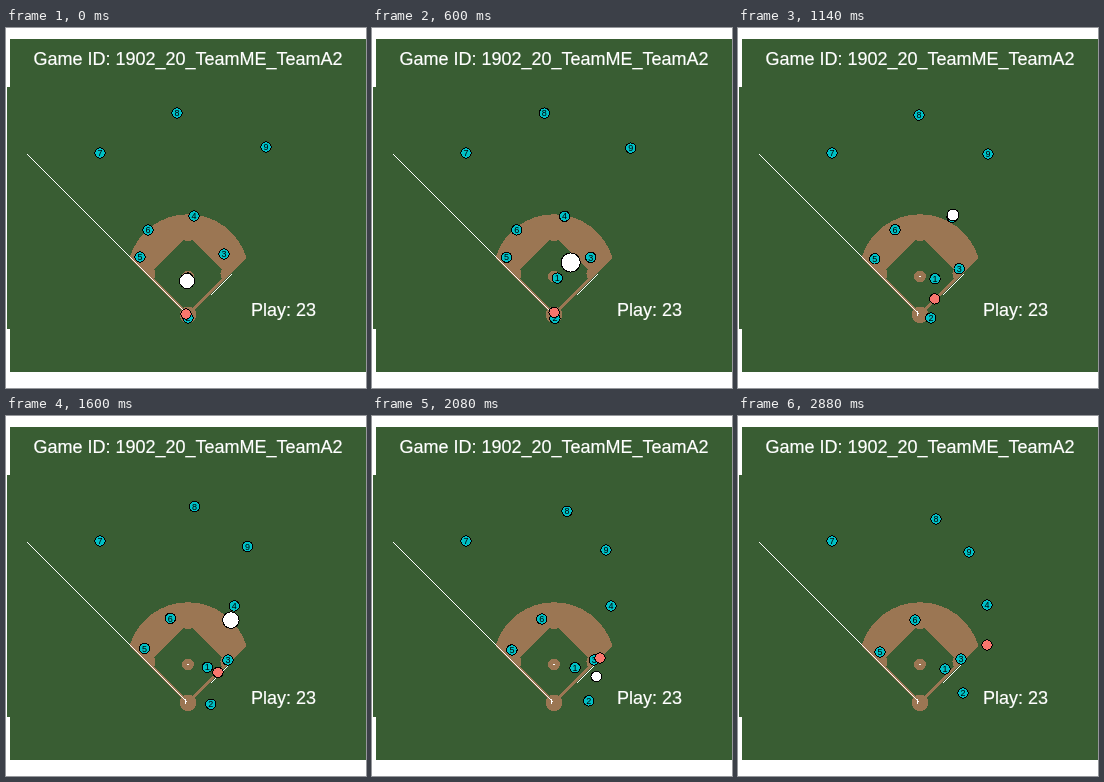
Animation of 360x360 px, one loop 2900 ms. Source, as an HTML page:

```html
<!DOCTYPE html>
<html lang="en">
<head>
<meta charset="utf-8">
<title>Baseball play</title>
<style>
  html, body { margin: 0; width: 100%; height: 100%; overflow: hidden; background: #fff; }
  svg { display: block; width: 100vw; height: 100vh; }
  text { font-family: "Liberation Sans", Arial, sans-serif; }
  .caption { font-size: 18px; fill: #fff; stroke: #fff; stroke-width: .2; }
  .grass { fill: #395d33; }
  .dirt { fill: #9b7653; }
  .chalk { stroke: #fff; fill: none; }
  .sharp { shape-rendering: crispEdges; }
  .dot { stroke: #000; }
  .fielder { fill: #00bfc4; }
  .runner { fill: #f8766d; }
  .ball { fill: #fff; }
  .number { font-size: 9px; text-anchor: middle; }
</style>
</head>
<body>
<svg viewBox="0 0 360 360">
  <g class="sharp">
    <rect class="grass" x="4" y="11" width="356" height="333"/>
    <rect class="grass" x="1" y="59" width="4" height="242"/>
    <path class="dirt" d="M123.5 230A61 61 0 0 1 240.5 230L182 288.5Z"/>
    <path class="grass" d="M182 207.8L220.2 246L182 284.2L143.8 246Z"/>
    <g class="dirt">
      <circle cx="182" cy="204.8" r="8.3"/>
      <path d="M141.1 237.7A8.3 8.3 0 0 1 147 251.9L141.1 246Z"/>
      <path d="M222.9 237.7A8.3 8.3 0 0 0 217 251.9L222.9 246Z"/>
      <circle cx="182" cy="248.5" r="5.9"/>
      <circle cx="182" cy="286.8" r="8.3"/>
    </g>
    <path class="chalk" d="M21.5 126.5L181.5 286.5M204.5 267.5L225.5 246.5M181 248.5h2M179.5 283v5"/>
  </g>
  <text class="caption" x="182" y="37" text-anchor="middle">Game ID: 1902_20_TeamME_TeamA2</text>
  <text class="caption" x="245" y="288">Play: 23</text>
  <g id="players"></g>
</svg>
<script>
const LOOP = 2900, STEP = 20, RUN_START = 500, RUN_END = 2880;

// Each run is a Bezier curve: start, two handles, end
const fielders = [
  [[182, 250], [209.5, 251], [199, 251.5], [207, 253]],
  [[182, 290], [188, 292], [229, 286], [225, 277]],
  [[218, 226], [224, 254], [221, 241], [223, 243]],
  [[188, 188], [225, 190], [244, 191], [249, 189]],
  [[134, 229], [138, 231], [140, 234.5], [142, 236]],
  [[142, 202], [165, 201], [170, 203.5], [177, 204]],
  [[94, 125]],
  [[171, 85], [181.5, 85], [202, 96], [198, 103]],
  [[260, 119], [251, 128], [225, 137], [231, 136]]
];
const runner = [[180, 286], [196, 274], [234.5, 230.5], [249, 229]];

// Pitch, hit, carry and throw; lift swells the ball in mid-flight
const plate = { x: 181, y: 286, r: 6 };
const pickup = { x: 215, y: 187, r: 6 };
const release = { x: 225, y: 190, r: 9 };
const flights = [
  { end: 190, from: { x: 181, y: 253, r: 7.5 }, to: plate },
  { end: 1140, from: plate, to: pickup, lift: 3.6, drag: 1.3 },
  { end: 1480, from: pickup, to: release },
  { end: 2280, from: release, to: { x: 224, y: 284, r: 4 } }
];

const clamp = u => Math.min(1, Math.max(0, u));
const mix = (a, b, u) => a + (b - a) * u;

function bezier([a, b = a, c = b, d = c], u) {
  const w = 1 - u;
  return [0, 1].map(k =>
    w * w * w * a[k] + 3 * u * w * w * b[k] + 3 * u * u * w * c[k] + u * u * u * d[k]);
}

function ballAt(t) {
  const i = flights.findIndex(f => t < f.end);
  if (i < 0) return null;
  const { end, from, to, lift = 0, drag = 1 } = flights[i];
  const begin = i ? flights[i - 1].end : 0;
  const u = 1 - Math.pow((end - t) / (end - begin), drag);
  return {
    x: mix(from.x, to.x, u),
    y: mix(from.y, to.y, u),
    r: mix(from.r, to.r, u) + lift * Math.sin(Math.PI * u)
  };
}

const layer = document.getElementById("players");
function add(tag, attrs) {
  const el = document.createElementNS("http://www.w3.org/2000/svg", tag);
  for (const key in attrs) el.setAttribute(key, attrs[key]);
  return layer.appendChild(el);
}
const addDot = kind => add("circle", { class: "dot sharp " + kind, r: 5.2 });

const dots = fielders.map(() => addDot("fielder"));
const numbers = fielders.map((_, i) => {
  const el = add("text", { class: "number" });
  el.textContent = i + 1;
  return el;
});
const runnerDot = addDot("runner");
const ballDot = addDot("ball");

function place(el, x, y) {
  el.setAttribute("transform", `translate(${x.toFixed(2)} ${y.toFixed(2)})`);
}

function draw(t) {
  const u = clamp((t - RUN_START) / (RUN_END - RUN_START));
  fielders.forEach((path, i) => {
    const [x, y] = bezier(path, u);
    place(dots[i], x, y);
    place(numbers[i], x, y + 3.2);
  });
  place(runnerDot, ...bezier(runner, u));

  const ball = ballAt(t);
  ballDot.style.display = ball ? "" : "none";
  if (ball) {
    place(ballDot, ball.x, ball.y);
    ballDot.setAttribute("r", ball.r.toFixed(2));
  }
}

const start = performance.now();
function tick() {
  const t = (performance.now() - start) % LOOP;
  draw(Math.floor(t / STEP) * STEP);
  requestAnimationFrame(tick);
}
tick();
</script>
</body>
</html>
```
